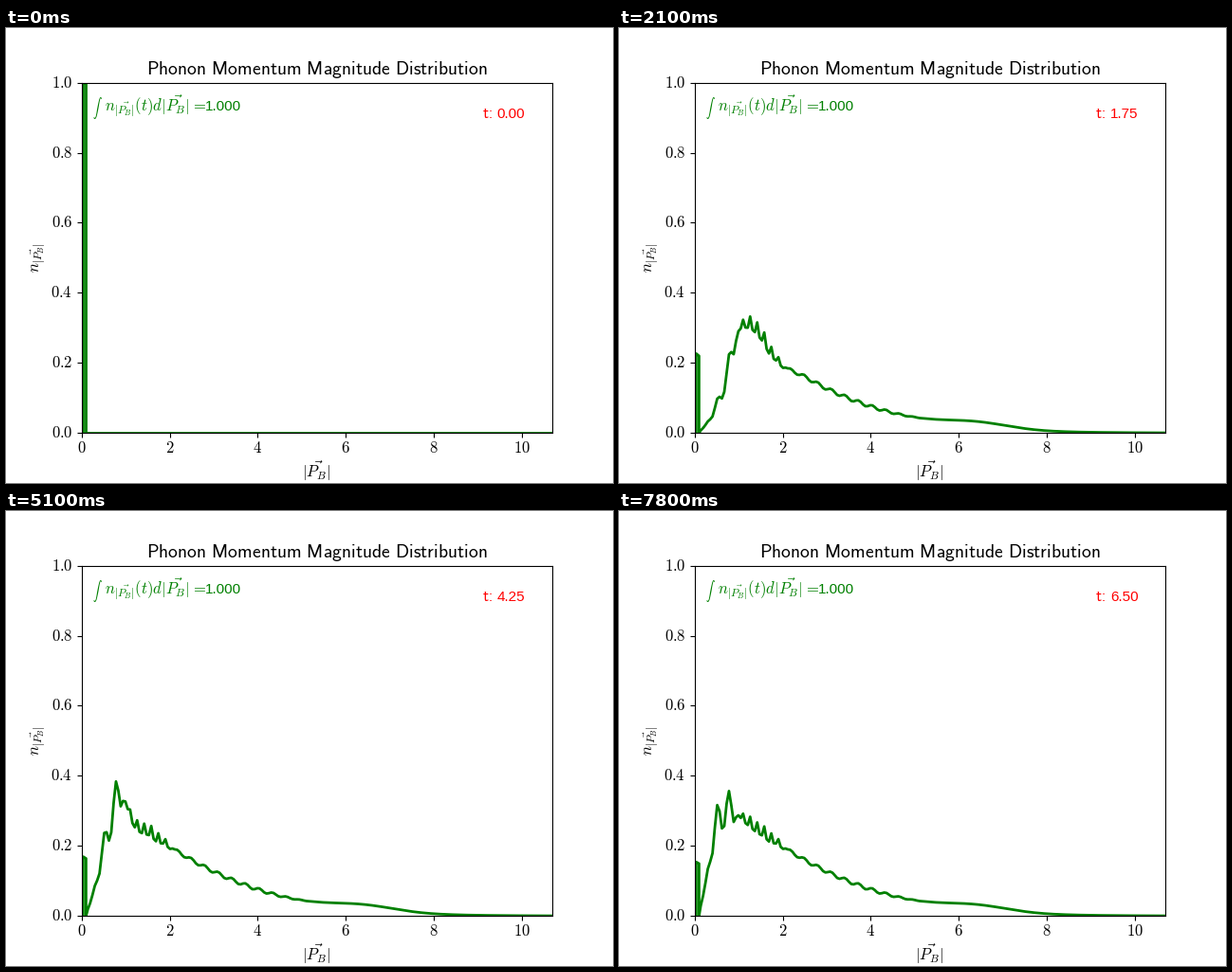
Animation, 640 px wide and 480 px high, one loop 8 s. Source, as a matplotlib script:

```python
import numpy as np
import matplotlib.pyplot as plt
from matplotlib.animation import FuncAnimation

WIDTH, HEIGHT = 640, 480
FRAMES, INTERVAL, HOLD = 80, 100, 3
TIME_STEP, END_TIME = 0.25, 6.5
X_MAX, BINS = 10.7, 200
END_EXCITED = 0.846  # share that has left zero momentum at END_TIME

plt.rcParams["mathtext.fontset"] = "cm"
plt.rcParams["font.size"] = 12

bins = np.arange(2, BINS)
x = (bins + 0.5) * X_MAX / BINS
peak_x = [0.03, 0.03, 0.095, 0.095]


def ripple(size, period, crest, centre, width):
    """Cosine over the bins, fading out away from its centre."""
    fade = np.exp(-((bins - centre) / width) ** 4)
    return size * fade * np.cos(2 * np.pi * (bins - crest) / period)


def growth(phase):
    return 1 - np.exp(-1.5 * phase) * np.cos(2.6 * phase)


rise = 1 - np.exp(-(x / 0.42) ** 2.2)
decay = np.exp(-0.94 - 0.27 * x - 0.035 * x**2)
shoulder = 0.0165 * np.exp(-((x - 6.4) / 1.05) ** 2)
settled = (rise * decay + shoulder
           + ripple(0.055, 5, 9, 11.5, 5.5)
           + ripple(0.020, 3, 26, 27, 9)
           + ripple(0.005, 5.8, 57.5, 58, 30))
rate = 0.08 * x + 0.26 * x**2
amplitude = settled / growth(rate * END_TIME)


def curve(t):
    body = amplitude * growth(rate * t)
    # The total is conserved: the peak holds whatever is not excited.
    top = 1 - END_EXCITED * body.sum() / settled.sum()
    right = top * (0.97 if t else 1)
    return np.r_[peak_x, x], np.r_[0, top, right, 0, body]


fig, ax = plt.subplots(figsize=(WIDTH / 100, HEIGHT / 100), dpi=100)
fig.subplots_adjust(left=0.125, right=0.9, bottom=0.11, top=0.88)
ax.set(xlim=(0, X_MAX), ylim=(0, 1))
x_ticks, y_ticks = range(0, 11, 2), np.linspace(0, 1, 6)
ax.set_xticks(x_ticks, [f"${v}$" for v in x_ticks])
ax.set_yticks(y_ticks, [f"${v:.1f}$" for v in y_ticks], va="center")
ax.tick_params(axis="x", pad=1.7)
ax.set_title(r"$\mathsf{Phonon\ Momentum\ Magnitude\ Distribution}$",
             fontsize=14.2)


def label(px, py, text, **style):
    return fig.text(px / WIDTH, 1 - py / HEIGHT, text, va="baseline", **style)


MOMENTUM = r"|\vec{P_B}|"
DENSITY = rf"n_{{{MOMENTUM}}}"
SANS = dict(family="Liberation Sans", fontsize=11)

label(327, 473.5, f"${MOMENTUM}$", ha="center")
label(36, 258.5, f"${DENSITY}$", rotation=90, rotation_mode="anchor")

label(96.5, 87.2, r"$\int$", ha="center", color="green", fontsize=6.8)
label(103.7, 88.2, rf"${DENSITY}(t)d{MOMENTUM}\hspace{{0.1}}=$",
      color="green")
label(210.3, 87.2, "1.000", color="green", **SANS)

label(501.6, 94.6, r"$\mathsf{t}$", color="red")
label(510.2, 94.6, ":", ha="center", color="red", **SANS)
clock = label(517.8, 94.6, "0.00", color="red", **SANS)

line, = ax.plot([], [], color="green", linewidth=2)


def update(frame):
    t = frame // HOLD * TIME_STEP
    line.set_data(*curve(t))
    clock.set_text(f"{t:.2f}")
    return line, clock


animation = FuncAnimation(fig, update, frames=FRAMES, interval=INTERVAL,
                          init_func=lambda: update(0), repeat=True,
                          repeat_delay=0)
plt.show()
```
